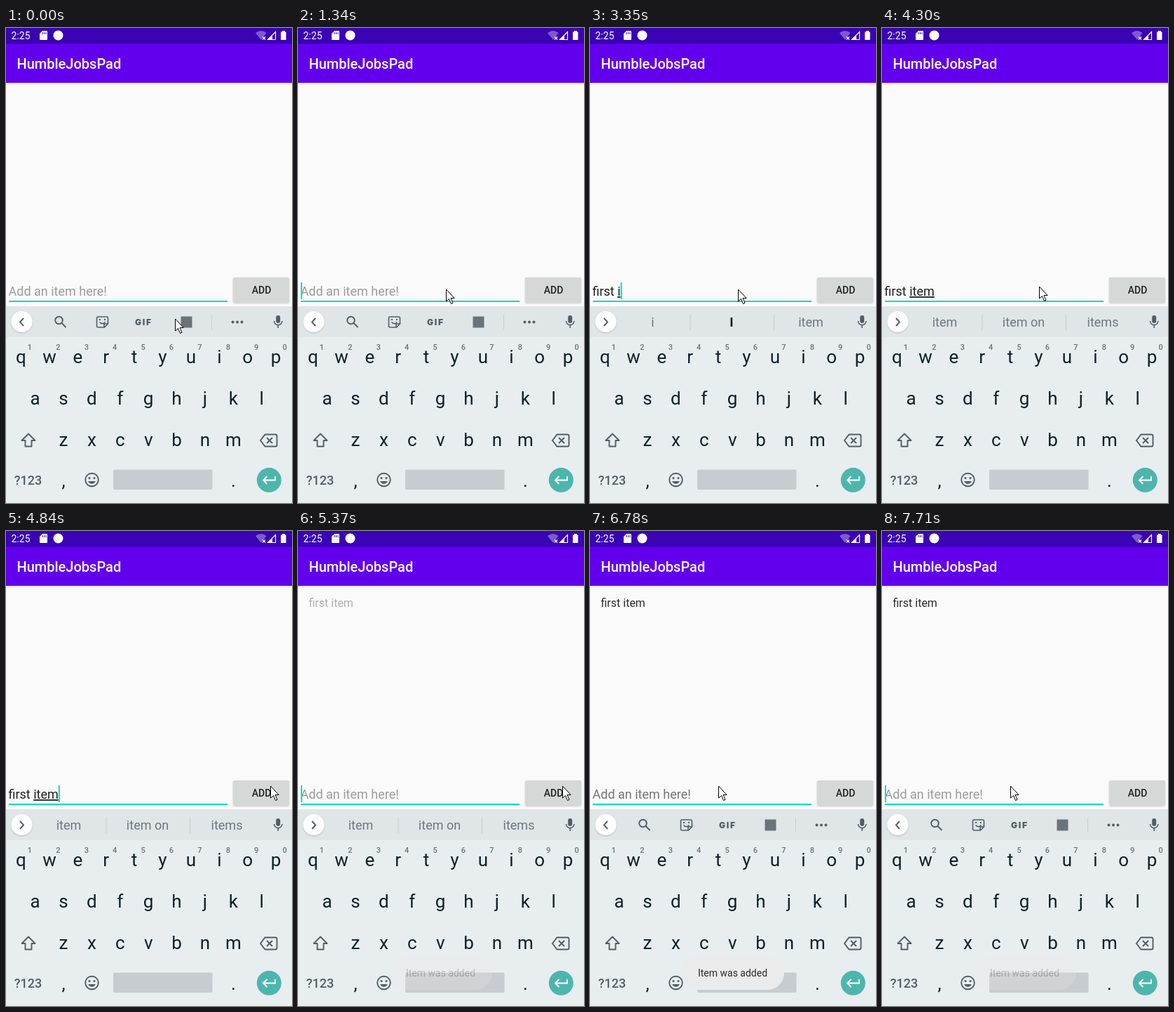
Animation of 408 by 676 pixels, one loop 8 s. Source, as an HTML page:

```html
<!DOCTYPE html>
<html lang="en">
<head>
<meta charset="utf-8">
<title>To-do list demo</title>
<style>
  html, body { margin: 0; width: 100%; height: 100%; overflow: hidden; background: #fafafa; }
  svg { display: block; width: 408px; height: 676px; font-family: Roboto, sans-serif; }
  text { white-space: pre; }
  .mid { text-anchor: middle; }
  .key { font-size: 26px; fill: #0d2029; }
  .digit { font-size: 11px; font-weight: 500; fill: #69747a; }
  .chip { font-size: 18px; fill: #6d7880; }
  .chip.best { font-weight: 700; fill: #0d1418; }
  .line { fill: none; stroke: #525e65; stroke-width: 1.9; }
  .thin { stroke-width: 1.6; }
  .solid { fill: #525e65; }
  .under { text-decoration: underline; text-decoration-thickness: 1px; }
</style>
</head>
<body>
<svg viewBox="0 0 408 676">
  <defs>
    <linearGradient id="barShade" x2="0" y2="1">
      <stop stop-color="#dcdce0"/><stop offset="1" stop-color="#fafafa"/>
    </linearGradient>
    <filter id="soft" x="-20%" y="-20%" width="140%" height="150%">
      <feDropShadow dx="0" dy="1" stdDeviation=".8" flood-opacity=".2"/>
    </filter>
  </defs>
  <rect width="408" height="676" fill="#fafafa"/>

  <!-- status and app bar -->
  <rect y="22" width="408" height="56" fill="#6200ee"/>
  <rect width="408" height="22.5" fill="#3a03b4"/>
  <rect y="78" width="408" height="3" fill="url(#barShade)"/>
  <g fill="#fff">
    <text x="7.500" y="16" font-size="14">2:25</text>
    <path d="M52 4h6q1 0 1 1v11q0 1-1 1h-9q-1 0-1-1V8z"/>
    <path d="M52 6v3M54.500 6v3M57 6v3" stroke="#3a03b4"/>
    <circle cx="74.500" cy="10.500" r="7"/>
    <path d="M356 7q8-6 15.500 0L364 17z" opacity=".35"/>
    <path d="M366 12.500l4 4m0-4l-4 4" stroke="#fff" stroke-width="1.300"/>
    <path d="M384.500 5.500v11h-11z" fill="none" stroke="#fff" stroke-width="1.200"/>
    <path d="M380 10v6.500h-6.500z"/>
    <path d="M394 4h4v1.500h1.500V17h-7.500V5.500h2z"/>
    <text x="15.500" y="58" font-size="20" font-weight="500">HumbleJobsPad</text>
  </g>

  <text id="item" x="15.500" y="108" font-size="16" fill="#2b2b2b">first item</text>

  <!-- entry field -->
  <text id="hint" x="3.500" y="381" font-size="18">Add an item here!</text>
  <text id="entry" x="3.500" y="381" font-size="18" fill="#212121"><tspan id="done"></tspan><tspan id="word" class="under"></tspan></text>
  <rect id="caret" y="362" width="2" height="24" fill="#03dac5"/>
  <rect x="4" y="388" width="312" height="2" fill="#03dac5"/>
  <rect id="button" x="324" y="355" width="80" height="36" rx="2" filter="url(#soft)"/>
  <text class="mid" x="364.500" y="378" font-size="14" font-weight="500" fill="#212121">ADD</text>

  <!-- keyboard -->
  <rect y="396" width="408" height="280" fill="#e8edf0"/>
  <rect y="396" width="408" height="44" fill="#e0e5e8"/>
  <circle cx="22.500" cy="418" r="15" fill="#fdfdfd" filter="url(#soft)"/>
  <path id="chevron" class="line"/>
  <g id="tools">
    <circle class="line" cx="75.500" cy="416" r="5.300"/>
    <path class="line" d="M79.500 420l6 6"/>
    <path class="line thin" d="M131.500 411h12q2 0 2 2v8l-5 5h-9q-2 0-2-2v-11q0-2 2-2z"/>
    <path class="line thin" d="M133.500 418.500q4 4.500 8 0M140 426v-3.500q0-1.500 1.500-1.500h4"/>
    <path class="solid" d="M133 414h2v2h-2zM140 414h2v2h-2z"/>
    <text class="solid" x="184" y="422.500" font-size="12" font-weight="900" letter-spacing="1.700" style="font-family:Inter,sans-serif">GIF</text>
    <rect x="249.500" y="410.500" width="16" height="16" fill="#68747a"/>
    <path d="M293.500 408v21" stroke="#cbd0d4"/>
    <g class="solid">
      <circle cx="323.500" cy="418.500" r="2"/><circle cx="330" cy="418.500" r="2"/><circle cx="336.500" cy="418.500" r="2"/>
    </g>
  </g>
  <g id="chips">
    <path d="M143 407v23M262.500 407v23" stroke="#c6cbcf"/>
    <text class="mid chip" x="89.500" y="425"></text>
    <text class="mid chip" x="202" y="425"></text>
    <text class="mid chip" x="315" y="425"></text>
  </g>
  <rect class="solid" x="385.200" y="409" width="6" height="11" rx="3"/>
  <path class="line thin" d="M382.500 417a5.700 5.700 0 0 0 11.400 0M388.200 422.500v4.500"/>
  <g id="keys"></g>
  <path class="line" d="M32 577.500l9.500 9.500h-5v8.500h-9V587h-5z" stroke-linejoin="round"/>
  <path class="line" d="M369.500 578.500h15q2 0 2 2v13q0 2-2 2h-15l-6.500-8.500zM372 583l8 8m0-8l-8 8"/>
  <text class="mid solid" x="31.500" y="649.500" font-size="18" font-weight="500">?123</text>
  <circle class="line" cx="122.500" cy="643" r="9.300"/>
  <path class="solid" d="M117.200 645h10.600q-1.800 3.800-5.300 3.800t-5.300-3.800z"/>
  <circle class="solid" cx="119" cy="640.500" r="1.500"/>
  <circle class="solid" cx="126" cy="640.500" r="1.500"/>
  <rect x="153" y="628.500" width="141.500" height="28.500" rx="2" fill="#c7ccd0"/>
  <circle cx="375.300" cy="643.300" r="17.500" fill="#4db6ac"/>
  <path d="M384 638v5.500h-16.500M372.500 638l-5.500 5.500 5.500 5.500" fill="none" stroke="#fff" stroke-width="2"/>

  <g id="toast">
    <rect x="131.500" y="605" width="145.500" height="48" rx="24" fill="#ebebeb"/>
    <text class="mid" x="203.500" y="633.500" font-size="14" fill="#2b2b2b">Item was added</text>
  </g>
  <path id="mouse" d="M.5 1v17l4-3.500 3 7 2.500-1.200-3-6.800h5.100z" fill="#fff" stroke="#000" stroke-linejoin="round"/>
</svg>
<script>
const $ = id => document.getElementById(id);
const LOOP = 8000;

// Each track is a list of [start time, value].
const caret = [[0, 0], [400, 1], [940, 0], [1340, 1], [3210, 0], [3350, 1], [4300, 0], [4840, 1],
  [5790, 0], [6220, 1], [6780, 0], [7320, 1]];
const hintColor = [[0, '#9c9c9c'], [6780, '#757575'], [6930, '#9c9c9c']];
const entry = [[0, '', ''], [1890, '', 'f'], [2020, '', 'fi'], [2160, '', 'fir'], [2290, '', 'firs'],
  [2430, '', 'first'], [2710, 'first ', ''], [3350, 'first ', 'i'], [3470, 'first ', 'it'],
  [3600, 'first ', 'ite'], [3740, 'first ', 'item'], [5220, '', '']];
const chips = [[0, ''], [1890, 'f|*for|from'], [2020, 'fi|*for|first'], [2160, 'fir|*for|first'],
  [2290, 'firs|*first|firsts'], [2430, 'first|first of|firsthand'], [2710, 'time|one|impression'],
  [3350, 'i|*I|item'], [3470, 'it|it is|item'], [3600, 'ite|*item|items'],
  [3740, 'item|item on|items'], [5520, '']];
const mouse = [[0, 241, 413], [670, 237, 406], [810, 226, 389], [940, 216, 376], [1080, 211, 371],
  [4300, 224, 367], [4430, 276, 354], [4570, 339, 347], [4700, 370, 357], [4840, 377, 362],
  [5650, 366, 362], [5790, 318, 363], [5930, 247, 364], [6070, 196, 363], [6220, 183, 362]];
const press = [[0, '#d6d7d7'], [5090, '#c5c6c6'], [5370, '#d6d7d7']];
const item = [[0, 0], [5370, .36], [5520, .85], [5650, 1]];
const toast = [[0, 0], [5370, .25], [5520, .75], [5650, 1], [7450, .75], [7580, .5], [7710, .25]];

const at = (track, t) => track.findLast(step => step[0] <= t).slice(1);

function label(cls, x, y, str) {
  const el = document.createElementNS('http://www.w3.org/2000/svg', 'text');
  el.setAttribute('class', 'mid ' + cls);
  el.setAttribute('x', x);
  el.setAttribute('y', y);
  el.textContent = str;
  $('keys').append(el);
}

[['qwertyuiop', 21.5, 477], ['asdfghjkl', 41.5, 536], ['zxcvbnm', 82, 595]].forEach(([row, x, y]) =>
  [...row].forEach((ch, i) => label('key', x + i * 40.4, y, ch)));
[...'1234567890'].forEach((ch, i) => label('digit', 34 + i * 40.4, 458, ch));
label('key', 82, 653, ',');
label('key', 324.5, 653, '.');

const chipTexts = [...$('chips').querySelectorAll('text')];

function showChips(list) {
  $('tools').style.display = list ? 'none' : '';
  $('chips').style.display = list ? '' : 'none';
  $('chevron').setAttribute('d', list ? 'M20 413l5 5.500-5 5.500' : 'M25 413l-5 5.500 5 5.500');
  if (!list) return;
  list.split('|').forEach((str, i) => {
    chipTexts[i].textContent = str.replace('*', '');
    chipTexts[i].classList.toggle('best', str[0] === '*');
  });
}

function draw(t) {
  const [done, word] = at(entry, t);
  $('done').textContent = done;
  $('word').textContent = word;
  const typed = done + word;
  $('hint').style.display = typed ? 'none' : '';
  $('hint').setAttribute('fill', at(hintColor, t)[0]);
  $('caret').setAttribute('x', typed ? 3.5 + $('entry').getComputedTextLength() : 4);
  $('caret').style.opacity = at(caret, t)[0];
  $('button').setAttribute('fill', at(press, t)[0]);
  $('item').style.opacity = at(item, t)[0];
  $('toast').style.opacity = at(toast, t)[0];
  $('mouse').setAttribute('transform', `translate(${at(mouse, t)})`);
  showChips(at(chips, t)[0]);
}

const start = performance.now();
function tick() {
  draw((performance.now() - start) % LOOP);
  requestAnimationFrame(tick);
}
tick();
</script>
</body>
</html>
```
